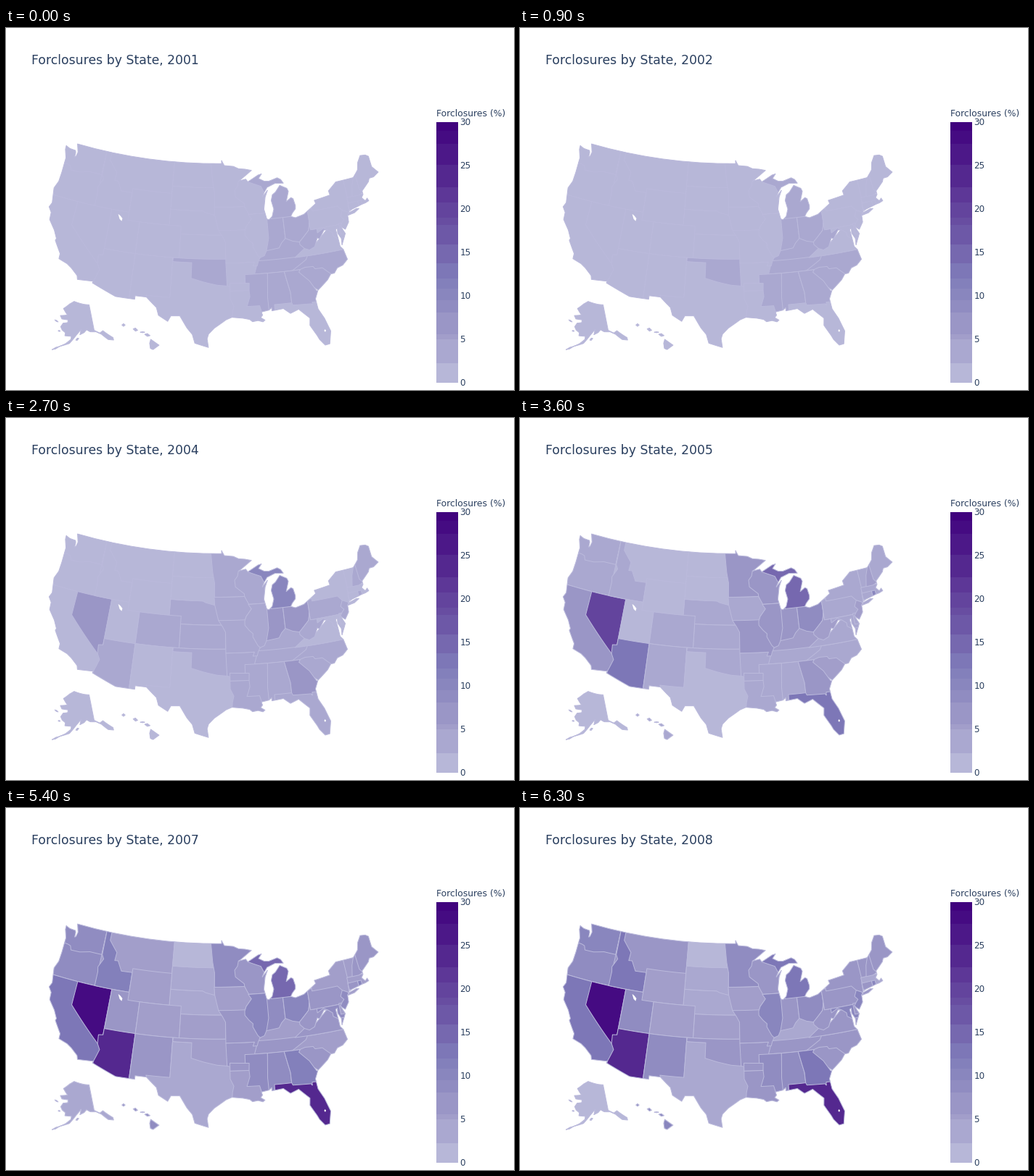
These frames come from a looping animation (700x500 px, 7.2 s). A matplotlib script:

```python
import numpy as np
import matplotlib.pyplot as plt
from matplotlib.animation import FuncAnimation
from matplotlib.collections import PolyCollection
from matplotlib.colors import LinearSegmentedColormap
from matplotlib.patches import Rectangle
from matplotlib.path import Path

W, H, DPI = 700, 500, 100
INK, BORDER = "#2a3f5f", "#bbbadc"
PX = 72 / DPI

purples = LinearSegmentedColormap.from_list(
    "purples", ["#bcbddc", "#9e9ac8", "#807dba", "#6a51a3", "#54278f", "#3f007d"])

# Colour bands of the legend, from the bottom edge upwards
EDGES = [490, 463, 430, 423, 393, 376, 360, 346, 325, 299, 272, 262, 241,
         220, 189, 160, 142, 130]
BANDS = [purples((490 - (a + b) / 2) / 360) for a, b in zip(EDGES, EDGES[1:])]

# Map scale and centre; the insets hang off both
K, CX, CY = 628, 285.8, 300.5


def albers(lon0, p1, p2, scale, anchor, at):
    """Conic equal-area projection that puts the anchor at a pixel."""
    s1, s2 = np.sin(np.radians([p1, p2]))
    n = (s1 + s2) / 2
    c = 1 - s1 ** 2 + 2 * n * s1

    def raw(west, lat):
        rho = np.sqrt(c - 2 * n * np.sin(np.radians(lat))) / n
        theta = n * np.radians(lon0 - west)
        return rho * np.sin(theta), rho * np.cos(theta)

    x0, y0 = raw(*anchor)

    def project(west, lat):
        x, y = raw(west, lat)
        return np.column_stack([at[0] + scale * (x - x0), at[1] + scale * (y - y0)])

    return project


MAIN = albers(96, 29.5, 45.5, K, (96.6, 38.7), (CX, CY))
ALASKA = albers(154, 55, 65, .35 * K, (156, 58.5), (CX - .307 * K, CY + .201 * K))
HAWAII = albers(157, 8, 18, K, (160, 19.9), (CX - .205 * K, CY + .212 * K))


def outline(flat, project=MAIN):
    """Project a ring of west/north degrees, so that parallels stay curved."""
    ring = np.array(flat, float).reshape(-1, 2)
    t = np.linspace(0, 1, 8, endpoint=False)[:, None]
    fine = np.vstack([a + (b - a) * t for a, b in zip(ring, np.roll(ring, -1, axis=0))])
    return project(fine[:, 0], fine[:, 1])


def box(west, east, north, south):
    return [west, north, east, north, east, south, west, south]


def islet(west, north, dw, dn, slant=0):
    return [west + dw, north - slant, west, north + dn,
            west - dw, north + slant, west, north - dn]


# One coastline trims every state, so most states are just a box or a few corners
PACIFIC = [
    122.76, 49, 122.5, 48.5, 122.25, 48, 122.4, 47.4, 122.6, 47.3, 122.65, 47.9,
    122.8, 48.13, 123.9, 48.17, 124.7, 48.38, 124.65, 47.9, 124.1, 46.9, 124.05, 45,
    124.1, 43.8, 124.55, 42.84, 124.1, 41, 124.4, 40.4, 123.8, 39.8, 123.7, 38.9,
    122.5, 37.8, 121.8, 36.85, 121.9, 36.6, 120.62, 35.15, 120.6, 34.5, 119.2, 34.15,
    118.4, 33.75, 117.3, 33, 117.12, 32.53]
MEXICO = [
    114.72, 32.72, 114.82, 32.5, 111.07, 31.33, 108.21, 31.33, 108.21, 31.78,
    106.53, 31.78, 104.9, 30.6, 104.5, 29.65, 103.1, 28.98, 102.7, 29.7, 101.4, 29.77,
    100.3, 28.3, 99.5, 27.5, 99.1, 26.4, 97.2, 25.9]
GULF = [
    97.4, 27, 97.2, 27.6, 96.4, 28.35, 94.7, 29.4, 93.85, 29.7, 92.3, 29.55, 91.3, 29.35,
    90.9, 29.05, 90.1, 29.15, 89.4, 28.95, 89.1, 29.15, 89.7, 29.5, 89.4, 29.8,
    89.55, 30.2, 88.4, 30.37, 88, 30.65, 88, 30.25, 86.3, 30.4, 85.35, 29.7, 84.1, 30.1,
    82.65, 28.8, 82.8, 27.9, 82, 26.5, 81.75, 25.95, 81.1, 25.13]
ATLANTIC = [
    80.45, 25.2, 80.03, 26.8, 80.6, 28.5, 81.3, 29.8, 81.45, 31.1, 80.9, 32.1, 79.2, 33.2,
    78.55, 33.86, 78, 33.87, 77.4, 34.45, 76.5, 34.65, 75.6, 35.25, 75.9, 36.55, 76.3, 37,
    76.35, 38, 76.45, 39.2, 76.15, 39.3, 76.25, 38.7, 75.85, 37.95, 75.95, 37.15,
    75.05, 38.45, 75.55, 39.45, 74.9, 38.95, 74.1, 39.75, 74, 40.6, 73.65, 41, 73, 41.22,
    71.2, 41.5, 70.6, 41.55, 69.95, 41.7, 70.1, 42.07, 70.5, 41.8, 71, 42.3, 70.6, 42.65,
    70.6, 43.1, 69.1, 44, 68.8, 44.4, 68, 44.4, 66.95, 44.8]
EAST_BORDER = [
    67.8, 45.7, 67.8, 47.07, 68.3, 47.35, 69.23, 47.46, 70, 46.7, 70.4, 45.8, 71.08, 45.3,
    71.5, 45.01, 74.7, 45, 76.3, 44.1, 76.2, 43.55, 79.05, 43.27, 78.9, 42.85, 81.2, 41.77,
    82.7, 41.5, 83.45, 41.73]
LAKES = [
    83.15, 42.1, 82.5, 42.6, 82.42, 43, 82.65, 43.9, 83, 44.07, 83.9, 43.65, 83.3, 44.9,
    83.5, 45.3, 84.7, 45.78, 85.6, 45, 86.2, 44.7, 86.5, 44, 86.2, 42.9, 86.6, 42,
    87.2, 41.62, 87.55, 41.75, 87.9, 43, 87.5, 44.5, 87, 45.3, 88, 44.55, 87.6, 45.1,
    87, 45.7, 85.5, 46.1, 84, 46, 84.4, 46.5, 85, 46.77, 86.6, 46.45, 87.4, 46.5,
    88.4, 46.9, 87.8, 47.45, 88.45, 47.35, 90.4, 46.57, 90.75, 46.93, 92, 46.75, 89.6, 48,
    90.8, 48.2, 92, 48.3, 92.95, 48.62, 94.65, 48.75, 95.15, 49.38, 95.15, 49]
LONG_ISLAND = [74, 40.58, 73.7, 40.87, 72.3, 41.15, 71.9, 41.07, 72.8, 40.7]
ALASKA_COAST = [
    156.5, 71.35, 146, 70.1, 141, 69.65, 141, 60.3, 137.5, 58.9, 135, 59.4, 130, 55.9,
    130.2, 55, 133.3, 55.8, 136.6, 58.3, 139.8, 59.6, 144, 60, 146.5, 60.9, 148.3, 60,
    151.5, 59.3, 150.5, 61.2, 154, 59.2, 158.5, 56.1, 164.7, 54.6, 161, 55.9, 157.7, 57.6,
    157.5, 58.7, 162, 58.7, 161.9, 59.8, 164.5, 60.6, 166, 61.7, 164.6, 63.1, 161, 63.5,
    161, 64.5, 166.2, 64.5, 168, 65.6, 162, 66.2, 166.5, 68.3, 161, 70.3]
BIG_ISLAND = [155.9, 20.25, 154.8, 19.5, 155.6, 18.95, 155.95, 19.1, 156.05, 19.75]

alaska = [outline(r, ALASKA) for r in (
    ALASKA_COAST, islet(166.6, 53.8, 2, .3, .8), islet(153.4, 57.7, 1, .4, .3),
    islet(170.2, 63.4, 1.5, .2, -.2), islet(166.5, 60.1, .8, .2))]
hawaii = [outline(r, HAWAII) for r in (
    BIG_ISLAND, islet(156.35, 20.8, .35, .18, -.08), islet(157, 21.15, .3, .06),
    islet(157.95, 21.48, .3, .2, -.08), islet(159.55, 22.05, .22, .17))]
coast = [outline(PACIFIC + MEXICO + GULF + ATLANTIC + EAST_BORDER + LAKES),
         outline(LONG_ISLAND)] + alaska + hawaii

# States above the lowest band before the rise
EARLY = set("OK MI IN OH KY WV NC SC GA AL MS".split())
HIT_2001, HIT_2003 = EARLY | {"TN"}, EARLY | {"MN"}
shapes, levels = [], []


def add(name, bands, rings):
    """Bands are for 2004, 2005, 2006 and 2008; the other years follow from them."""
    b04, b05, b06, b08 = bands
    b01 = int(name in HIT_2001)
    b03 = max(1, b04 - 2) if name in HIT_2003 else 0
    for ring in rings:
        shapes.append(ring)
        levels.append([b01, b01, b03, b04, b05, b06, (b06 + b08 + 1) // 2, b08])


def state(name, bands, *parts):
    add(name, bands, [outline(p) for p in parts])


# Later states cover earlier ones, so each border is traced only once
state("OR", (0, 1, 3, 4), box(125, 116.2, 46.3, 42))
state("WA", (0, 1, 2, 5), [
    125, 49.1, 117.03, 49.1, 117.03, 46, 119.2, 46, 121, 45.65, 122.6, 45.6, 122.9, 46.1,
    123.4, 46.2, 125, 46.3])
state("CA", (0, 3, 6, 7), box(125, 114, 42, 32))
state("NV", (3, 11, 14, 15), [120, 42, 114.04, 42, 114.04, 36, 114.63, 35, 120, 39])
state("MT", (0, 0, 1, 3), box(117, 104.05, 49.1, 44.4))
state("ID", (0, 1, 4, 7), [
    117.03, 49.1, 116.05, 49.1, 116.05, 48, 114.4, 46.65, 114.5, 45.6, 113.9, 45.65,
    113, 44.45, 111.05, 44.5, 111.05, 42, 117.03, 42, 117.03, 43.8, 117.2, 44.4,
    116.5, 45.5, 116.92, 46])
state("UT", (0, 0, 1, 4), box(114.04, 109.05, 42, 37))
state("AZ", (1, 7, 12, 13), [
    114.05, 37, 109.05, 37, 109.05, 31, 114.9, 31, 114.72, 32.72, 114.5, 33.3,
    114.14, 34.3, 114.63, 35, 114.75, 36.1, 114.05, 36.2])

state("NE", (1, 1, 1, 1), box(104.05, 95.3, 43, 40))
state("KS", (1, 1, 2, 2), box(102.05, 94.62, 40, 37))
state("SD", (0, 0, 1, 1), [
    104.05, 45.94, 96.45, 45.94, 96.45, 42.5, 98, 42.8, 98.5, 43, 104.05, 43])
state("ND", (0, 0, 0, 0), box(104.05, 96.5, 49.1, 45.94))
state("WY", (0, 0, 1, 2), box(111.05, 104.05, 45, 41))
state("CO", (1, 1, 1, 2), box(109.05, 102.05, 41, 37))
state("NM", (0, 1, 1, 4), box(109.05, 103.04, 37, 31))
state("TX", (0, 0, 1, 1), [
    103.04, 36.5, 93.5, 36.5, 93.5, 25, 106.53, 25, 106.53, 31.78, 106.62, 32, 103.04, 32])
state("OK", (1, 1, 1, 3), [
    103, 37, 94.43, 37, 94.48, 33.64, 96, 33.75, 98.1, 34.13, 100, 34.56, 100, 36.5,
    103, 36.5])

state("MN", (1, 3, 4, 4), [
    97.23, 49.5, 89, 49.5, 89, 43.5, 96.45, 43.5, 96.45, 45.3, 96.8, 46.6])
state("WI", (1, 3, 3, 3), [
    92.1, 46.75, 90, 47.2, 87, 47, 86.5, 42.49, 90.65, 42.5, 91.22, 43.5, 91.25, 43.85,
    92.75, 44.75, 92.85, 45.6, 92.3, 46.1])
state("IA", (1, 1, 2, 2), [
    96.5, 43.5, 91.22, 43.5, 90.15, 41.9, 91.1, 41, 91.4, 40.4, 95.77, 40.58, 96.4, 42.5])
state("KY", (1, 2, 3, 1), box(89.5, 81.9, 39.2, 36.5))
state("TN", (1, 1, 2, 3), box(90.3, 81.6, 36.62, 35))
state("AR", (1, 1, 2, 3), [
    94.62, 36.5, 89.6, 36.5, 90.2, 35, 91.1, 33.9, 91.17, 33, 94.04, 33, 94.04, 33.55,
    94.48, 33.64])
state("MO", (1, 3, 3, 3), [
    95.77, 40.58, 90.5, 40.58, 89.2, 38, 89.15, 37, 89.5, 36.5, 89.7, 36, 90.37, 36,
    90.1, 36.5, 94.62, 36.5, 94.62, 39.1, 95.1, 39.8])
state("IL", (1, 3, 4, 5), [
    90.65, 42.49, 87.2, 42.49, 87.2, 38, 88.05, 37.8, 88.45, 37.2, 89.15, 37, 89.5, 37.3,
    90.2, 38.4, 90.15, 38.8, 90.75, 39.25, 91.4, 39.9, 91.4, 40.4, 91.1, 41, 90.15, 41.9])
state("IN", (3, 3, 4, 3), [
    87.53, 42, 84.81, 42, 84.81, 39.1, 85.5, 38.6, 86, 38, 88.05, 37.8, 87.53, 39.35])
state("OH", (3, 4, 5, 4), [
    84.81, 42, 80.52, 42.3, 80.52, 40.64, 80.85, 39.7, 81.8, 39, 82.6, 38.42, 83.7, 38.65,
    84.81, 39.1])
state("MI", (5, 8, 8, 7), box(86.85, 82, 45.84, 41.73), [
    90.4, 46.57, 89.2, 47.4, 88, 47.8, 83, 47.8, 83, 45.9, 84.7, 45.87, 86.8, 45.5,
    87.6, 45.1, 88.1, 45.9])

state("MS", (1, 1, 3, 4), box(91.7, 88.2, 35, 30))
state("AR", (1, 1, 2, 3), [
    94.04, 34, 91.1, 33.9, 91.17, 33, 94.04, 33])
state("LA", (1, 1, 1, 3), [
    94.04, 33, 91.17, 33, 91.1, 32.2, 91.6, 31, 89.73, 31, 89.5, 30.2, 88.8, 30,
    88.8, 28.5, 93.9, 28.5, 93.75, 30.3, 93.53, 31.1, 94.04, 32])
state("AL", (1, 1, 3, 4), [
    88.2, 35, 85.6, 35, 85, 32.3, 85, 30, 88.4, 30, 88.47, 31.9])
state("FL", (1, 7, 12, 13), box(87.55, 79.5, 31, 24.5))
state("NC", (1, 1, 1, 3), [
    84.32, 35, 82, 36.12, 81.67, 36.57, 75, 36.57, 75, 33, 83, 35])
state("SC", (1, 2, 3, 3), [
    83.2, 35, 82.3, 35.2, 81.05, 35.15, 80.8, 34.82, 79.67, 34.8, 78.4, 33.75, 80, 31.5,
    82, 33, 83.5, 34.8])
state("GA", (3, 3, 4, 7), [
    85.6, 35, 83.1, 35, 83.35, 34.7, 81.95, 33.45, 81.1, 32.1, 80.5, 31.8, 80.5, 30.72,
    82, 30.75, 82.05, 30.36, 82.2, 30.57, 84.86, 30.7, 85, 31, 85, 32.3])
state("VA", (0, 1, 2, 3), [
    83.67, 36.57, 75, 36.57, 75, 38, 77.7, 39.5, 80, 38, 81.97, 37.54])
state("WV", (1, 2, 3, 3), [
    80.52, 40.64, 80.52, 39.72, 78, 39.72, 77.72, 39.32, 78.35, 39.4, 79.3, 38.42,
    79.65, 38.58, 80.3, 37.55, 81.2, 37.25, 81.97, 37.54, 82.6, 38.1, 82.6, 38.42,
    81.8, 39, 80.85, 39.7])

state("PA", (1, 1, 3, 3), box(80.52, 74.7, 42.3, 39.72))
state("MD", (0, 1, 3, 5), [
    79.48, 39.72, 75, 39.72, 75, 38.02, 76.35, 38, 77.05, 38.4, 77.05, 38.85,
    77.72, 39.32, 78.4, 39.62, 79.48, 39.2])
state("DE", (0, 1, 1, 3), box(75.75, 75, 39.83, 38.46))
state("NY", (0, 1, 1, 3), [
    79.76, 45.2, 73.35, 45.2, 73.27, 42.75, 73.5, 42.05, 73.6, 41, 71.8, 41.2, 71.8, 40.5,
    74, 40.5, 73.9, 41, 74.7, 41.36, 75.35, 42, 79.76, 42])
state("NJ", (1, 2, 3, 5), [
    74.7, 41.36, 73.9, 41, 73.5, 40.5, 74, 38.8, 75, 38.8, 75.55, 39.5, 75.15, 39.9,
    74.75, 40.2, 75.2, 40.65])
state("VT", (0, 1, 1, 3), box(73.35, 71.5, 45.1, 42.73))
state("ME", (1, 1, 3, 3), box(71.1, 66.5, 48, 43))
state("MA", (0, 1, 3, 1), box(73.45, 69.5, 42.75, 41.2))
state("NH", (1, 2, 3, 3), [
    71.5, 45.01, 71.08, 45.4, 70.98, 43.4, 70.6, 43, 70.6, 42.87, 71.3, 42.7, 72.5, 42.73,
    72.05, 44.1])
state("CT", (0, 1, 3, 3), box(73.5, 71.8, 42.05, 41.18))
state("RI", (1, 5, 5, 5), box(71.8, 71.2, 42.02, 41.2))
add("AK", (0, 0, 1, 0), alaska)
add("HI", (0, 1, 3, 5), hawaii)

levels = np.array(levels)
lakes = [outline([112.83, 41.55, 112.45, 41.4, 112, 41.1, 112.05, 40.75, 112.45, 40.97]),
         outline(islet(80.8, 26.95, .14, .18))]

fig = plt.figure(figsize=(W / DPI, H / DPI), dpi=DPI, facecolor="white")
ax = fig.add_axes([0, 0, 1, 1])
ax.set_xlim(0, W)
ax.set_ylim(H, 0)
ax.axis("off")


def label(x, y, text, size):
    return ax.text(x, y, text, size=size * PX, color=INK, family="DejaVu Sans",
                   ha="left", va="baseline")


land = PolyCollection(shapes, edgecolors=BORDER, linewidths=PX)
ax.add_collection(land)
trim = Path.make_compound_path(
    *[Path(np.vstack([ring, ring[:1]]), closed=True) for ring in coast])
land.set_clip_path(trim, transform=ax.transData)
ax.add_collection(PolyCollection(coast, facecolors="none", edgecolors=BORDER,
                                 linewidths=PX))
ax.add_collection(PolyCollection(lakes, facecolors="white", edgecolors="none"))

for low, high, color in zip(EDGES, EDGES[1:], BANDS):
    ax.add_patch(Rectangle((593, high), 30, low - high, color=color, lw=0,
                           antialiased=False))
for value in range(0, 31, 5):
    label(625.6, 494.4 - 12 * value, str(value), 12)
label(593, 122, "Forclosures (%)", 12.4)
title = label(35, 50, "", 17.2)


def draw(i):
    land.set_facecolor([BANDS[k] for k in levels[:, i]])
    title.set_text(f"Forclosures by State, {2001 + i}")
    return land, title


anim = FuncAnimation(fig, draw, frames=8, interval=900, repeat=True, repeat_delay=0)
plt.show()
```
